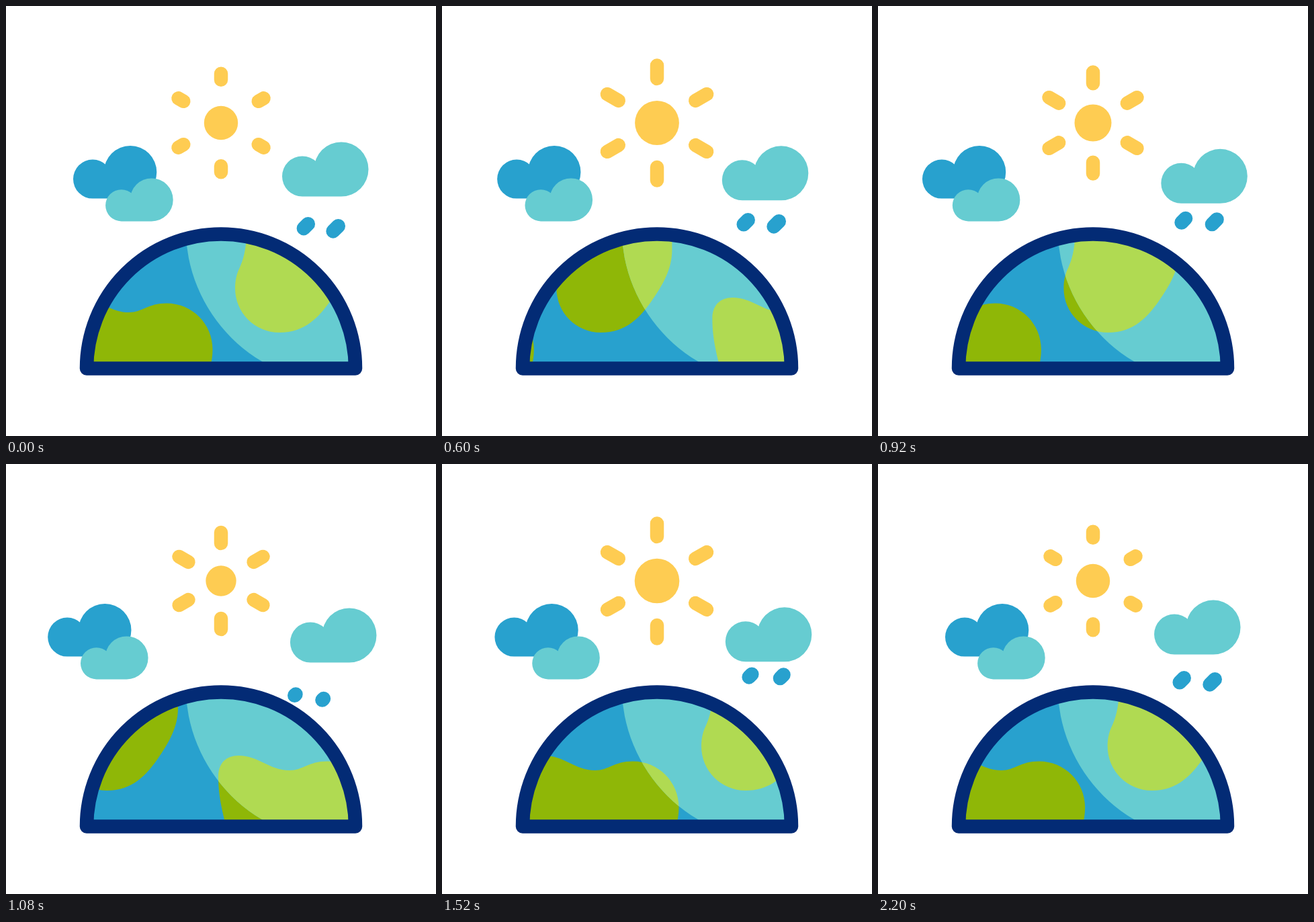
These frames come from a looping animation (640x640 px, 2240 ms). An HTML page with a canvas:

```html
<!DOCTYPE html>
<html lang="en">
<head>
<meta charset="utf-8">
<title>Weather and earth</title>
<style>
  html, body { margin: 0; width: 100%; height: 100%; overflow: hidden; background: #fff; }
  canvas { display: block; width: 100vw; height: 100vh; }
</style>
</head>
<body>
<canvas id="stage" width="640" height="640"></canvas>
<script>
const ctx = document.getElementById('stage').getContext('2d');
const LOOP = 2240, STEP = 40, TAU = Math.PI * 2;
const NAVY = '#032b75', BLUE = '#28a1ce', TEAL = '#66ccd1';
const GREEN = '#8fb707', LIME = '#b0da52', YELLOW = '#fecc52';

const clamp = x => Math.min(1, Math.max(0, x));
const smooth = x => { x = clamp(x); return x * x * (3 - 2 * x); };

// Eased value along [time, value] keys
function track(t, keys) {
  if (t <= keys[0][0]) return keys[0][1];
  for (let i = 1; i < keys.length; i++) {
    const [t0, a] = keys[i - 1], [t1, b] = keys[i];
    if (t <= t1) return a + (b - a) * smooth((t - t0) / (t1 - t0));
  }
  return keys[keys.length - 1][1];
}

// Cubic curve along [time, value, slope] keys
function curve(t, keys) {
  let i = 1;
  while (i < keys.length - 1 && t > keys[i][0]) i++;
  const [t0, a, m] = keys[i - 1], [t1, b, n] = keys[i];
  const h = t1 - t0, s = (t - t0) / h, r = 1 - s;
  return a * r * r * (1 + 2 * s) + b * s * s * (3 - 2 * s) + h * s * r * (m * r - n * s);
}

const SPIN = [[0, 0, -.02], [320, -7, -.06], [800, -401, -1.25], [1080, -753, -.95],
  [1520, -947, -.2], [1880, -988.5, -.02], [2240, -992, -.02]];
const WRAP = 496;
const FAR = [[120, 0], [1120, -38], [2000, 0]];
const NEAR = [[0, 0], [1000, -38], [1880, 0]];
const RAIN_CLOUD = [[0, 0], [1280, 12.8], [2240, 0]];
const SUN = [[40, 25.2], [700, 33.4], [1120, 22.4], [1540, 33.4], [2220, 25.2]];
const RAY_TIMES = [120, 560, 1100, 1560, 2000];
const keyed = values => values.map((v, i) => [RAY_TIMES[i], v]);
const RAY_OUT = keyed([83.6, 96, 82.3, 96, 83.6]);
const RAY_IN = keyed([54.1, 56, 45.8, 56, 54.1]);

function disc(x, y, r, color) {
  ctx.fillStyle = color;
  ctx.beginPath();
  ctx.arc(x, y, r, 0, TAU);
  ctx.fill();
}

function pill(x0, y0, x1, y1, width, color) {
  ctx.strokeStyle = color;
  ctx.lineWidth = width;
  ctx.lineCap = 'round';
  ctx.beginPath();
  ctx.moveTo(x0, y0);
  ctx.lineTo(x1 + .01, y1);
  ctx.stroke();
}

// Two lobes standing on a shared base line
function cloud(x, base, r1, gap, r2, color) {
  ctx.fillStyle = color;
  ctx.beginPath();
  ctx.arc(x, base - r1, r1, 0, TAU);
  ctx.closePath();
  ctx.moveTo(x + gap + r2, base - r2);
  ctx.arc(x + gap, base - r2, r2, 0, TAU);
  ctx.rect(x, base - r1, gap, r1);
  ctx.fill();
}

const wavy = new Path2D(`M90 545 C81 510 77 490 77 465 C77 445 89 434 107 434
  C137 434 153 456 183 456 C203 456 211 442.5 239 442.5
  C277 442.5 307.5 473 307.5 511 C307.5 523 305 535 302 545 Z`);
const round = new Path2D(`M358 335 C358 362 353 378 348 389 C343 399 341 409 341 420
  C341 456.5 370.5 486 407 486 C446 486 466 462 482 440
  C500 414 514 390 513 360 L513 335 Z`);

function lands(shift, color) {
  ctx.fillStyle = color;
  for (let k = 0; k < 4; k++) {
    ctx.save();
    ctx.translate(shift + k * WRAP, 0);
    ctx.fill(wavy);
    ctx.fill(round);
    ctx.restore();
  }
}

function dome() {
  ctx.beginPath();
  ctx.arc(320, 539.5, 200, Math.PI, TAU);
  ctx.closePath();
}

function earth(t) {
  const shift = curve(t, SPIN);
  ctx.save();
  dome();
  ctx.clip();
  ctx.fillStyle = BLUE;
  ctx.fillRect(100, 320, 440, 240);
  lands(shift, GREEN);
  ctx.beginPath();
  ctx.arc(499, 330, 231.5, 0, TAU);
  ctx.clip();
  ctx.fillStyle = TEAL;
  ctx.fillRect(100, 320, 440, 240);
  lands(shift, LIME);
  ctx.restore();
  dome();
  ctx.strokeStyle = NAVY;
  ctx.lineWidth = 20.5;
  ctx.lineJoin = 'round';
  ctx.stroke();
}

function sun(t) {
  const x = 320, y = 174, cap = 10.25;
  disc(x, y, track(t, SUN), YELLOW);
  const a = track(t, RAY_IN) + cap, b = track(t, RAY_OUT) - cap;
  for (let i = 0; i < 6; i++) {
    const s = Math.sin(i * TAU / 6), c = Math.cos(i * TAU / 6);
    pill(x + s * a, y - c * a, x + s * b, y - c * b, cap * 2, YELLOW);
  }
}

// Drops fall every 320 ms, stepping at 30 per second
function rain(t) {
  const period = 320;
  const phase = Math.floor(t * .03 + 1e-6) / .03 % period;
  for (const age of [phase, phase + period]) {
    if (age < 123 || age > 495) continue;
    const lead = smooth((age - 123) / 375);
    const trail = smooth(Math.pow(clamp((age - 140) / 350), 1.35));
    for (const [x, y, len] of [[463, 311, 37], [510.5, 311.5, 44]])
      pill(x - trail * len, y + trail * len, x - lead * len, y + lead * len, 21, BLUE);
  }
}

function draw(t) {
  ctx.fillStyle = '#fff';
  ctx.fillRect(0, 0, 640, 640);
  sun(t);
  cloud(129 + track(t, FAR), 286.6, 29, 56, 39.3, BLUE);
  cloud(171.7 + track(t, NEAR), 320.4, 23.6, 45, 32, TEAL);
  earth(t);
  rain(t);
  const drift = track(t, RAIN_CLOUD);
  cloud(441 + drift, 283.5 + drift, 30, 58, 40.5, TEAL);
}

const start = performance.now();
function tick() {
  const t = (performance.now() - start) % LOOP;
  draw(Math.floor(t / STEP) * STEP);
  requestAnimationFrame(tick);
}
tick();
</script>
</body>
</html>
```
